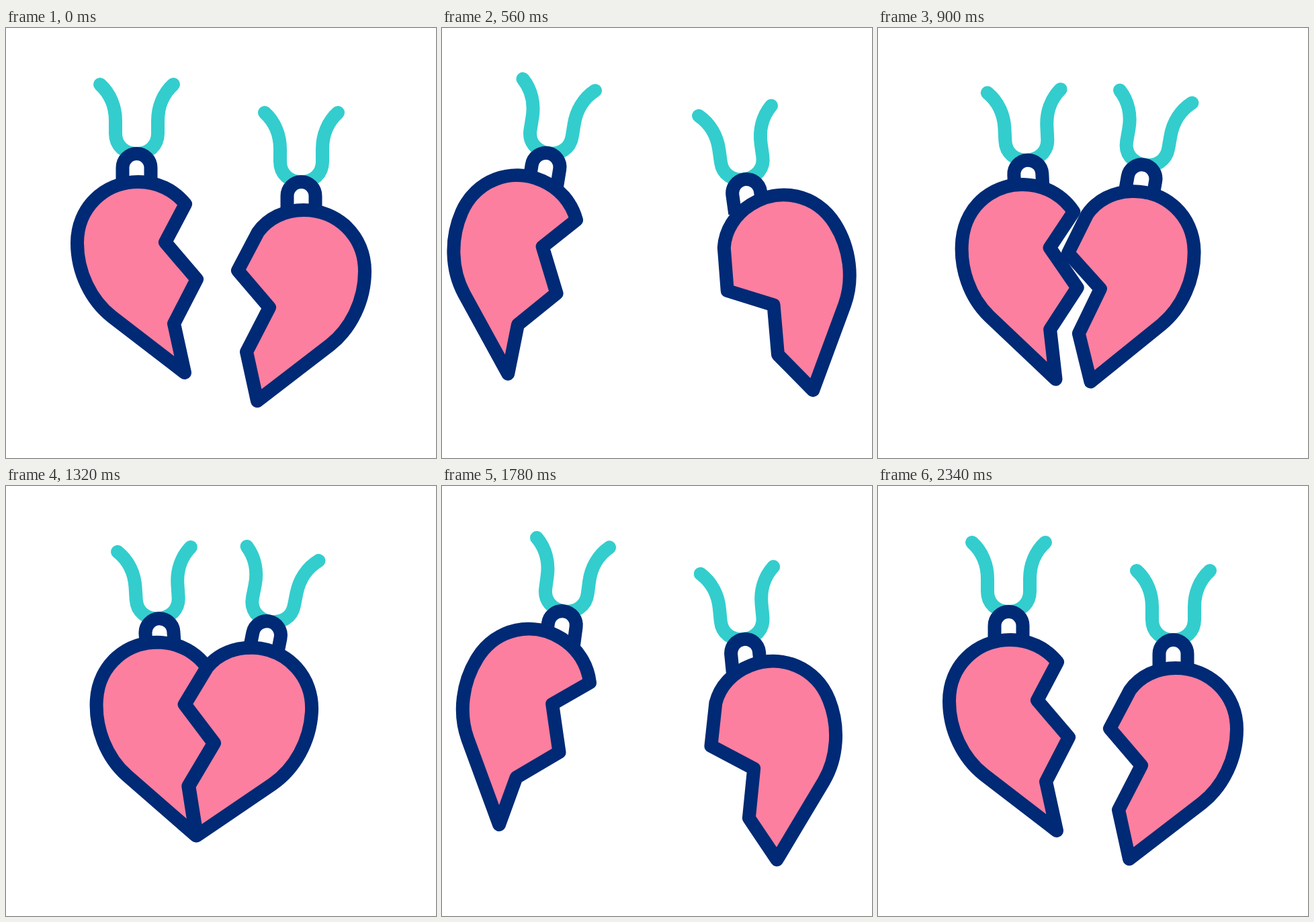
Write an HTML page that moves like this. It is 640 px wide and 640 px high and loops after 2400 ms.

```html
<!DOCTYPE html>
<html lang="en">
<head>
<meta charset="utf-8">
<title>Two halves of a heart</title>
<style>
  html, body { margin: 0; width: 100%; height: 100%; overflow: hidden; background: #fff; }
  svg { display: block; width: 100vw; height: 100vh; }
  path { fill: none; stroke: #002a75; stroke-width: 20; stroke-linecap: round; stroke-linejoin: round; }
  .chain { stroke: #33cdcd; }
  .ring { stroke-linecap: butt; }
  .half { fill: #fc7f9f; }
</style>
</head>
<body>
<svg viewBox="0 0 640 640">
  <defs>
    <g id="hanger">
      <path class="chain" d="M-54.5 0C-39 14-31.5 34-31.5 54V73C-31.5 91-18 103 0 103S31.5 91 31.5 73V54C31.5 34 39 14 54.5 0"/>
      <path class="ring" d="M-21 152V124A21 21 0 0 1 21 124V152"/>
    </g>
  </defs>
  <g id="left"><use href="#hanger"/><path class="half"/></g>
  <g id="right"><use href="#hanger"/><path class="half"/></g>
</svg>
<script>
const LOOP = 2400, RING_Y = 124;

const swing = (x, y, angle) => [x, y, angle];
// A half is stored as matrix parts, so blending two poses shortens it a little
const tilt = (x, y, angle) => {
  const rad = angle * Math.PI / 180;
  return [Math.cos(rad), Math.sin(rad), x, y];
};

const ease = u => (1 - Math.cos(Math.PI * u)) / 2;

// Cycle: rest, swing out, join, hold, swing away, rest.
// A bias under 1 gives an early rush, over 1 a late one.
function cycle([start, out, join, part, away, end], [rest, outPose, joined, awayPose], [early, late]) {
  const steps = [
    [start, out, rest, outPose, 1],
    [out, join, outPose, joined, early],
    [join, part, joined, joined, 1],
    [part, away, joined, awayPose, late],
    [away, end, awayPose, rest, early]
  ];
  return t => {
    const [from, to, a, b, bias] = steps.find(s => t < s[1]) || steps[4];
    const u = Math.min(1, Math.max(0, (t - from) / (to - from)));
    const k = ease(u ** bias);
    return a.map((v, i) => v + (b[i] - v) * k);
  };
}

// Both halves share the crack; the round side is mirrored by the sign
function halfPath(sign, shift) {
  const at = (x, y) => `${x + shift} ${y} `;
  const side = (x, y) => at(x * sign, y);
  return 'M' + at(1, 54) + 'L' + at(-29, 111) + at(18, 166) + at(-16, 232) + at(0, 305) + side(108, 222)
    + 'C' + side(140, 197) + side(160, 155) + side(160, 112)
    + 'C' + side(160, 60) + side(120, 21) + side(69, 21)
    + 'C' + side(41, 21) + side(16, 33) + at(1, 54) + 'Z';
}

function pendant(id, x, y, sign, shift, hanger, half) {
  const group = document.getElementById(id);
  const path = group.querySelector('.half');
  path.setAttribute('d', halfPath(sign, shift));
  return t => {
    const [mx, my, angle] = hanger(t);
    const [c, s, dx, dy] = half(t);
    group.setAttribute('transform', `translate(${x + mx} ${y + my}) rotate(${angle})`);
    path.setAttribute('transform', `matrix(${c} ${s} ${-s} ${c} ${dx} ${RING_Y + dy})`);
  };
}

const swingTimes = [100, 520, 1020, 1300, 1820, 2340];
const rush = [.65, 1.25], even = [1, 1];

const pendants = [
  pendant('left', 194.5, 84, -1, 71.5,
    cycle(swingTimes, [swing(0, 0, 0), swing(-25, -.5, 10.5), swing(26, 10.5, -3.7), swing(0, 0, 7.8)], rush),
    cycle([100, 620, 1020, 1300, 1820, 2340],
      [tilt(0, 0, 0), tilt(1, 0, 15), tilt(1.9, -6.4, 7.1), tilt(9, 0, 25)], even)),
  pendant('right', 439.5, 126, 1, -65.5,
    cycle(swingTimes, [swing(0, 0, 0), swing(-1, -.5, -9.9), swing(-27.5, -25.5, 11.2), swing(0, 0, -6)], rush),
    cycle([100, 620, 1020, 1300, 1700, 2200],
      [tilt(0, 0, 0), tilt(-8, 0, -25), tilt(-21.1, 1.6, -7.8), tilt(-4, 0, -17)], even))
];

const start = performance.now();
function tick() {
  const t = (performance.now() - start) % LOOP;
  pendants.forEach(draw => draw(t));
  requestAnimationFrame(tick);
}
tick();
</script>
</body>
</html>
```
